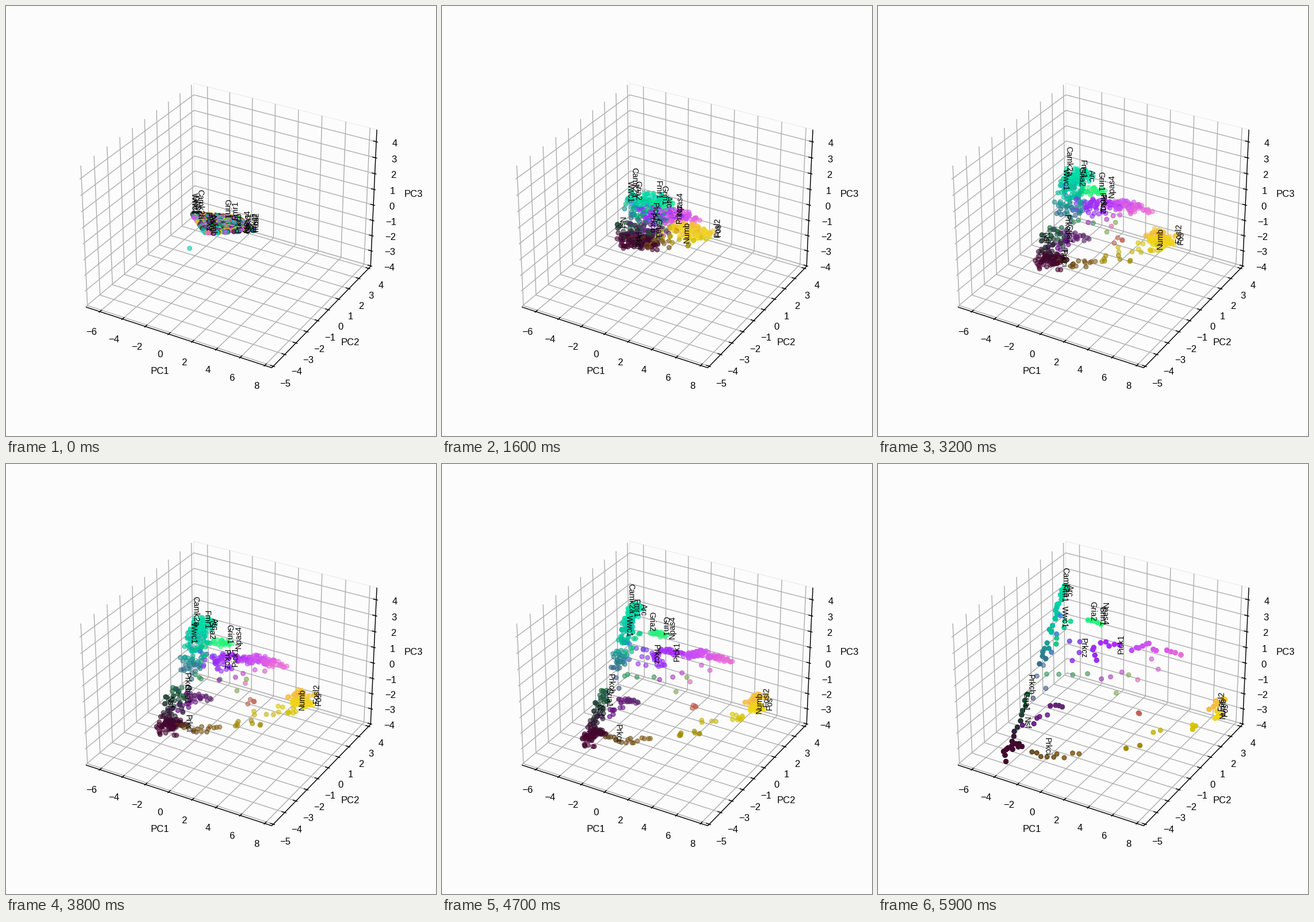
Write a matplotlib script that moves like this. It is 748 px wide and 748 px high and loops after 6000 ms.

```python
import numpy as np
import matplotlib.pyplot as plt
from matplotlib.animation import FuncAnimation

plt.rcParams["font.family"] = "Liberation Sans"
SIZE, FRAMES = 748, 60
BACK, GRID = "#fcfcfc", "#b0b0b0"
LIMITS = [(-7.25, 8.57), (-5.13, 4.20), (-4.035, 4.745)]
BOX = np.array([4, 4, 3]) * 0.29762
rng = np.random.default_rng(4)

fig = plt.figure(figsize=(SIZE / 100, SIZE / 100), dpi=100, facecolor=BACK)
ax = fig.add_axes([0, 0, 1, 1])
ax.set_xlim(0, SIZE)
ax.set_ylim(SIZE, 0)
ax.axis("off")


def project(p):
    """Unit-cube coordinates to stage pixels, seen from elev 30, azim -60."""
    q = (np.asarray(p, float) - 0.5) * BOX
    right = q @ [0.8660, 0.5, 0]
    up = q @ [-0.25, 0.4330, 0.8660]
    depth = 10 - q @ [0.4330, -0.75, 0.5]
    scale = 0.77 * SIZE / 0.185
    return np.stack([391.1 + scale * right / depth,
                     369.9 - scale * up / depth], axis=-1)


def line(*points, color=GRID, width=1.05, z=1):
    xy = project(points)
    ax.plot(xy[:, 0], xy[:, 1], color=color, lw=width, zorder=z,
            solid_capstyle="butt")


def caption(x, y, text):
    ax.text(x, y + 6, text, fontsize=12, ha="center", va="baseline")


def point(axis, value, base):
    p = np.array(base, float)
    p[axis] = value
    return p


def draw_axis(axis, values, bend, base, tick_axis, out, offset):
    """Grid lines, ticks and tick labels of one axis."""
    lo, hi = LIMITS[axis]
    for value in values:
        u = (value - lo) / (hi - lo)
        line(*[point(axis, u, b) for b in bend])
        p = point(axis, u, base)
        step = point(tick_axis, out / 12, (0, 0, 0))
        line(p - 0.2 * step, p + 0.1 * step, color="black", z=3)
        x, y = project(p) + offset
        caption(x, y, str(value).replace("-", "\u2212"))


# back pane edges, then grid and axes
line((0, 1, 0), (0, 1, 1), (1, 1, 1), color="#ebebeb", width=0.8, z=0)
line((0, 1, 0), (1, 1, 0), color="#e4e4e4", width=0.8, z=0)
draw_axis(0, range(-6, 9, 2), [(0, 0, 0), (0, 1, 0), (0, 1, 1)],
          (0, 0, 0), 1, -1, (-14.5, 34.5))
draw_axis(1, range(-5, 5), [(1, 0, 0), (0, 0, 0), (0, 0, 1)],
          (1, 0, 0), 0, 1, (21, 29))
draw_axis(2, range(-4, 5), [(0, 0, 0), (0, 1, 0), (1, 1, 0)],
          (1, 1, 0), 0, 1, (32, 1.5))
line((0, 0, 0), (1, 0, 0), (1, 1, 0), (1, 1, 1), color="black", z=3)
caption(267.5, 634.5, "PC1")
caption(599, 584, "PC2")
caption(709, 325.5, "PC3")

ends, colors = [], []


def strand(keys, spots, stack, spread, first, last):
    """Stacks of dots along a bent line, blending from first to last colour."""
    keys = np.array(keys, float)
    steps = np.hypot(*np.diff(keys, axis=0).T)
    along = np.append(0, np.cumsum(steps))
    t = np.linspace(0, 1, spots)
    path = np.column_stack([np.interp(t * along[-1], along, keys[:, i])
                            for i in (0, 1)])
    path += rng.normal(0, spread, path.shape)
    shade = np.array([plt.matplotlib.colors.to_rgb(c) for c in (first, last)])
    blend = shade[0] + (shade[1] - shade[0]) * t[:, None]
    ends.append(np.repeat(path, stack, axis=0))
    colors.append(np.repeat(blend, stack, axis=0))


# teal ridge and its loose green neighbours
strand([(326, 212), (316, 242)], 9, 8, 2.2, "#00e0a5", "#00d6a8")
strand([(312, 252), (308, 272), (299, 294)], 10, 5, 3, "#0ac8a5", "#00be96")
strand([(297, 312), (282, 346)], 7, 4, 3.5, "#14a096", "#306e87")
strand([(318, 264), (303, 326)], 3, 2, 1, "#3282dc", "#4173be")
strand([(288, 350), (272, 363), (291, 390), (270, 407)], 4, 1, 1,
       "#3c6ea0", "#3c416e")
strand([(338, 270), (318, 283), (311, 310)], 5, 2, 3, "#00d787", "#00be78")
strand([(295, 366), (327, 371), (363, 360)], 4, 1, 2, "#28965f", "#3c8c50")
strand([(367, 270), (388, 280)], 5, 5, 1.5, "#23f082", "#32f578")

# violet to pink band
strand([(332, 308), (351, 307), (349, 335), (338, 342)], 4, 2, 1,
       "#6e4be1", "#9632f0")
strand([(377, 339), (375, 318), (391, 308), (419, 320)], 9, 5, 3,
       "#962df5", "#af2dfa")
strand([(387, 374), (422, 362)], 3, 1, 1, "#962daf", "#b941c8")
strand([(440, 322), (463, 314), (486, 322)], 8, 7, 2, "#c34bf8", "#da5aeb")
strand([(501, 324), (527, 331)], 4, 8, 1.5, "#de5ae6", "#eb6cd7")
strand([(475, 340), (498, 352), (452, 375)], 3, 1, 1, "#cd50d7", "#d269af")
strand([(436, 367), (414, 399)], 2, 1, 1, "#7da54b", "#7da54b")

# yellow corner and the trail back from it
strand([(577, 427), (598, 408), (604, 411)], 6, 7, 1.5, "#f5bc41", "#f5c337")
strand([(587, 428), (597, 437), (585, 442)], 6, 9, 2, "#f0d023", "#f0d714")
strand([(553, 451), (548, 461)], 3, 3, 2, "#dac600", "#d4c000")
strand([(492, 463), (479, 467)], 2, 2, 0.5, "#c3b414", "#c3b414")
strand([(456, 490), (431, 494)], 2, 4, 0.5, "#a08a00", "#a08a00")
strand([(453, 433), (455, 434)], 2, 2, 0.3, "#be5f50", "#be5f50")
strand([(345, 509), (320, 510), (266, 500)], 9, 2, 3, "#875f19", "#55370f")

# dark corner, the rise to green and the purple branch
strand([(218, 512), (224, 494), (249, 493), (233, 482)], 13, 6, 2.5,
       "#480530", "#3c0c2d")
strand([(234, 474), (246, 442), (259, 401)], 9, 5, 2, "#301630", "#16643c")
strand([(252, 457), (295, 434)], 5, 2, 3, "#550073", "#691e82")
strand([(301, 420), (320, 422)], 4, 6, 1.2, "#691e7d", "#5f2d6e")

ends, colors = np.vstack(ends), np.vstack(colors)
colors = np.column_stack([colors, np.full(len(colors), 0.6)])

# every dot sets out from one tilted, flat patch
a, b = rng.random((2, len(ends), 1))
top = np.array([321, 360]) + a * np.array([83, 7])
bottom = np.array([347, 396]) + a * np.array([87, -5])
starts = top + b * (bottom - top)

style = dict(s=30, linewidths=1, zorder=4)
dots = ax.scatter(*starts.T, c=colors, **style)
lone = ax.scatter([319.3], [421.3], color=(0.2, 0.82, 0.73, 0.75), **style)

# name, then text centre at the start and at the end
GENES = [
    ("Camk2a", 339, 345, 327, 206), ("Wwc1", 329, 344, 326, 266),
    ("Gria2", 330, 345, 375, 256), ("Fmr1", 397, 355, 324, 225),
    ("Grin1", 386, 353, 391, 264), ("Arc", 418, 385, 334, 220),
    ("Npas4", 419, 374, 395, 261), ("Pick1", 352, 376, 422, 313),
    ("Prkcz", 431, 376, 358, 320), ("Prkcb", 403, 376, 267, 384),
    ("Gria1", 421, 377, 258, 413), ("Numb", 360, 382, 599, 424),
    ("Fos", 434, 376, 603, 427), ("Fosl2", 434, 375, 596, 412),
    ("Nsf", 333, 350, 259, 450), ("Prkci", 357, 378, 295, 492),
]
names = [ax.text(x, y, gene, fontsize=10, ha="center", va="center", zorder=5)
         for gene, x, y, _, _ in GENES]


def update(frame):
    t = frame / (FRAMES - 1)
    xy = starts + (ends - starts) * t
    order = np.argsort(xy[:, 1], kind="stable")
    dots.set_offsets(xy[order])
    dots.set_facecolors(colors[order])
    dots.set_edgecolors(colors[order])
    lone.set_visible(frame == 0)
    for label, (_, x0, y0, x1, y1) in zip(names, GENES):
        x, y = x0 + (x1 - x0) * t, y0 + (y1 - y0) * t
        # text follows the vertical axis and flips at the vanishing line
        lean = (397 - x) * 0.008
        side = 1 if lean <= 0 else -1
        label.set_position((x + 1.4 * side, y))
        label.set_rotation(lean + 90 * side)
    return [dots, lone, *names]


anim = FuncAnimation(fig, update, frames=FRAMES, interval=100, repeat=True,
                     repeat_delay=0, blit=False)
plt.show()
```
